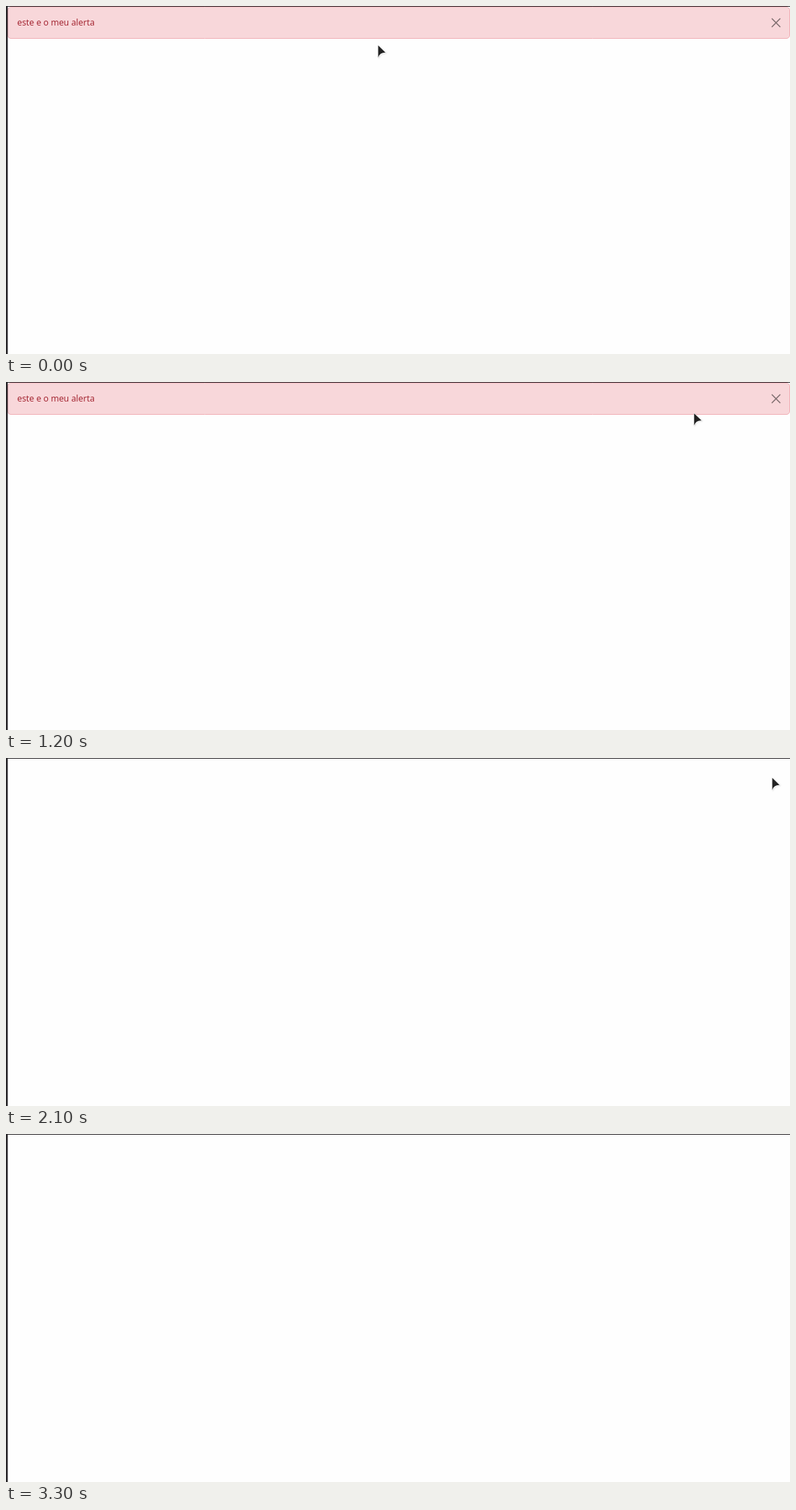
Recreate the animation shown at these times as an HTML page with a canvas. Size 1122 by 499 pixels, loop 4.3 s.

```html
<!DOCTYPE html>
<html lang="pt">
<head>
<meta charset="utf-8">
<title>Alerta</title>
<style>
  html, body { margin: 0; width: 100%; height: 100%; overflow: hidden; background: #fefefe; }
  canvas { display: block; }
</style>
</head>
<body>
<canvas id="stage" width="1122" height="499"></canvas>
<script>
const ctx = document.getElementById('stage').getContext('2d');
const LOOP = 4300, STEP = 100;
const HOVER = 1400, FOCUS = 2000, CLOSED = 2100, GONE = 3300;

// Pointer sweeps, each starting where the last one ended; "via" bends the path
const home = { x: 532, y: 56 };
const sweeps = [
  { from: 200, to: 500, x: 574, y: 79, via: { x: 275, y: 170 } },
  { from: 500, to: 800, x: 597, y: 72 },
  { from: 800, to: 1400, x: 1087, y: 37 },
  { from: 1400, to: 1800, x: 1096, y: 28 },
  { from: 2500, to: 2800, x: 960, y: 88 },
  { from: 2800, to: 3100, x: 963, y: 68 },
  { from: 3100, to: 3200, x: 791, y: 55 }
];

const arrow = new Path2D('M0.6 0.6 L11.3 10.9 Q3.2 10.4 0.6 18 Z');
const hand = new Path2D();
hand.roundRect(-1.5, 0.5, 3.5, 12, 1.7);
hand.roundRect(-1.5, 6.5, 10.8, 11, 2.5);
hand.roundRect(-5, 8.7, 6, 4, 1.7);

const ease = k => k * k * k * (k * (6 * k - 15) + 10);
const bend = (a, b, c, k) => (1 - k) ** 2 * a + 2 * k * (1 - k) * b + k * k * c;

function pointerAt(t) {
  let p = home;
  for (const s of sweeps) {
    if (t < s.to) {
      const k = ease(Math.max(0, (t - s.from) / (s.to - s.from)));
      const via = s.via || { x: (p.x + s.x) / 2, y: (p.y + s.y) / 2 };
      return [bend(p.x, via.x, s.x, k), bend(p.y, via.y, s.y, k)];
    }
    p = s;
  }
  return [p.x, p.y];
}

function box(x, y, w, h, r) {
  ctx.beginPath();
  ctx.roundRect(x, y, w, h, r);
}

function drawCross(alpha) {
  ctx.save();
  ctx.translate(1102, 24);
  ctx.globalAlpha = alpha;
  ctx.strokeStyle = '#000';
  ctx.lineWidth = 1.5;
  ctx.lineCap = 'round';
  ctx.beginPath();
  for (const s of [-1, 1]) {
    ctx.moveTo(-5.7, -5.7 * s);
    ctx.lineTo(5.7, 5.7 * s);
  }
  ctx.stroke();
  ctx.restore();
}

function drawAlert(t) {
  ctx.fillStyle = '#f8d7da';
  ctx.strokeStyle = '#f1aeb5';
  ctx.lineWidth = 1;
  box(2.5, 1.5, 1119, 45, 4.5);
  ctx.fill();
  ctx.stroke();

  ctx.fillStyle = '#a52834';
  ctx.font = '12.3px "Noto Sans", "Open Sans", sans-serif';
  ctx.fillText('este e o meu alerta', 16, 28.3);

  if (t >= FOCUS) {
    ctx.strokeStyle = 'rgba(13, 110, 253, 0.25)';
    ctx.lineWidth = 3.2;
    box(1081.8, 0.4, 41.2, 47.2, 5);
    ctx.stroke();
  }
  drawCross(t >= FOCUS ? 1 : t >= HOVER ? 0.75 : 0.5);
}

function drawPointer(t) {
  const shape = t >= HOVER && t < CLOSED ? hand : arrow;
  ctx.save();
  ctx.translate(...pointerAt(t));
  ctx.lineJoin = 'round';
  ctx.lineWidth = 1.2;
  ctx.strokeStyle = 'rgba(255, 255, 255, 0.8)';
  ctx.shadowColor = 'rgba(0, 0, 0, 0.2)';
  ctx.shadowBlur = 2;
  ctx.shadowOffsetX = ctx.shadowOffsetY = 0.8;
  ctx.stroke(shape);
  ctx.shadowColor = 'transparent';
  ctx.fillStyle = '#222';
  ctx.fill(shape);
  ctx.restore();
}

function draw(t) {
  ctx.fillStyle = '#fefefe';
  ctx.fillRect(0, 0, 1122, 499);
  if (t < CLOSED) drawAlert(t);
  ctx.fillStyle = '#252326';
  ctx.fillRect(0, 0, 1122, 1);
  ctx.fillRect(0, 0, 2.5, 499);
  if (t < GONE) drawPointer(t);
}

const start = performance.now();
function tick() {
  const t = (performance.now() - start) % LOOP;
  draw(Math.floor(t / STEP) * STEP);
  requestAnimationFrame(tick);
}
tick();
</script>
</body>
</html>
```
